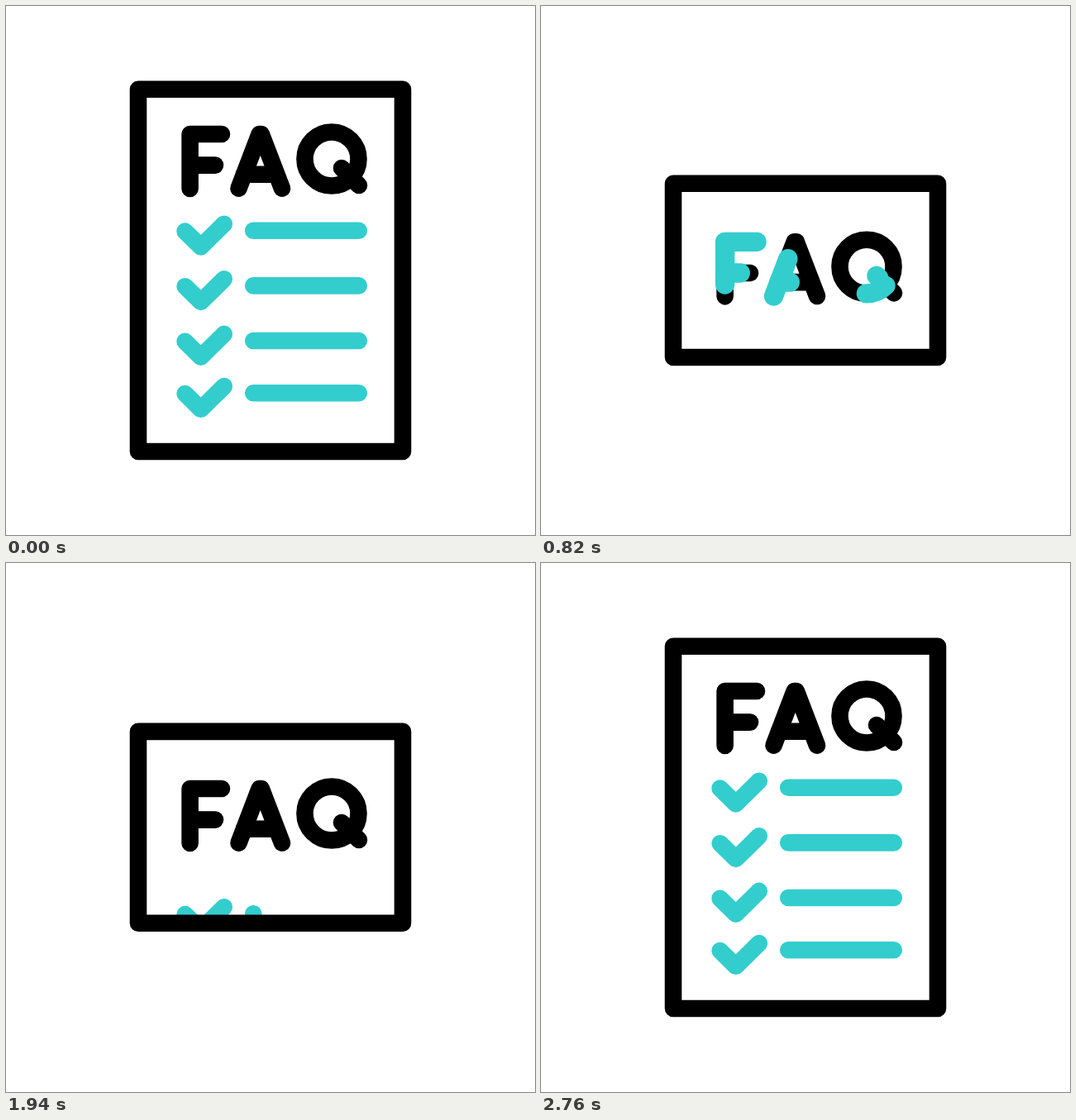
These frames come from a looping animation (640 px wide and 640 px high, 3.02 s). An HTML page:

```html
<!DOCTYPE html>
<html lang="en">
<head>
<meta charset="utf-8">
<title>FAQ checklist</title>
<style>
  html, body { margin: 0; height: 100%; overflow: hidden; background: #fff; }
  svg { display: block; width: 100vw; height: 100vh; fill: none; stroke: #000;
        stroke-width: 20.6; stroke-linecap: round; stroke-linejoin: round; }
  .accent { stroke: #33cdcd; }
  #glow { stroke-width: 23.4; }
</style>
</head>
<body>
<svg viewBox="0 0 640 640" role="img" aria-label="FAQ">
  <clipPath id="inside"><rect class="panel" x="160" width="320"/></clipPath>
  <g clip-path="url(#inside)">
    <g id="rows" class="accent"></g>
    <g id="title">
      <g id="ink"></g>
      <g id="glow" class="accent"></g>
    </g>
  </g>
  <rect class="panel" x="160" width="320"/>
</svg>
<script>
const LOOP = 3020;
const FOLD_TIME = 800, CLOSE_AT = 143, OPEN_END = 2396;
const TRACE_TIME = 460, ERASE_DELAY = 433;
const LINE_TIME = 680, LINE_AT = 1921, LINE_STEP = 57.2;

// Each letter stroke with the time its coloured trace begins
const letterStrokes = [
  ['M261 155H222.6V221', 468],
  ['M225 192.6H253', 566],
  ['M281.5 220.7L306.6 155H308.8L334 220.7', 641],
  ['M288 203.8H327', 641],
  ['M417 208A32.5 32.5 0 0 1 371 162A32.5 32.5 0 0 1 417 208', 718],
  ['M406 196L427 217', 718],
];
const rowOffsets = [0, 66.6, 133.2, 196.4];

const $ = id => document.getElementById(id);
const clamp = v => Math.min(1, Math.max(0, v));
const smooth = v => (v = clamp(v)) * v * (3 - 2 * v);

// cubic-bezier(.57, 0, 0, 1): quick in the middle, long soft tail
function swift(x) {
  x = clamp(x);
  let lo = 0, hi = 1;
  for (let i = 0; i < 24; i++) {
    const u = (lo + hi) / 2;
    if (1.71 * (1 - u) ** 2 * u + u ** 3 < x) lo = u; else hi = u;
  }
  return smooth(hi);
}

function addPath(parent, d) {
  const path = document.createElementNS('http://www.w3.org/2000/svg', 'path');
  path.setAttribute('d', d);
  parent.append(path);
  return path;
}

const traces = letterStrokes.map(([d, begin]) => {
  addPath($('ink'), d);
  const path = addPath($('glow'), d);
  path.setAttribute('pathLength', 1);
  return { path, begin };
});

const lines = rowOffsets.map((dy, i) => {
  addPath($('rows'), `M216.6 ${272.6 + dy}L235.7 ${291.4 + dy}L263.8 ${263.7 + dy}`);
  return { path: addPath($('rows'), ''), y: 271.8 + dy, begin: LINE_AT + LINE_STEP * i };
});

const panels = document.querySelectorAll('.panel');

function draw(t) {
  const fold = t < 1300
    ? swift((t - CLOSE_AT) / FOLD_TIME)
    : swift((OPEN_END - t) / FOLD_TIME);
  for (const panel of panels) {
    panel.setAttribute('y', 100.7 + 115 * fold);
    panel.setAttribute('height', 438.3 - 230 * fold);
  }
  $('title').setAttribute('transform', `translate(0 ${131.5 * fold})`);
  $('rows').setAttribute('transform', `translate(0 ${170 * fold})`);

  for (const { path, begin } of traces) {
    const grow = (t - begin) / TRACE_TIME;
    const erase = (t - begin - ERASE_DELAY) / TRACE_TIME;
    const from = smooth(erase);
    path.style.strokeDasharray = `${Math.max(0, smooth(grow) - from)} 2`;
    path.style.strokeDashoffset = -from;
    path.style.opacity = grow > 0 ? clamp((0.84 - erase) / 0.2) : 0;
  }

  // Lines reset while the panel is shut, then draw themselves again
  for (const { path, y, begin } of lines) {
    const length = t < 1300 ? 1 : swift((t - begin) / LINE_TIME);
    path.setAttribute('d', `M299.2 ${y}h${127.6 * length + 0.01}`);
  }
}

const startTime = performance.now();
function tick() {
  draw((performance.now() - startTime) % LOOP);
  requestAnimationFrame(tick);
}
tick();
</script>
</body>
</html>
```
